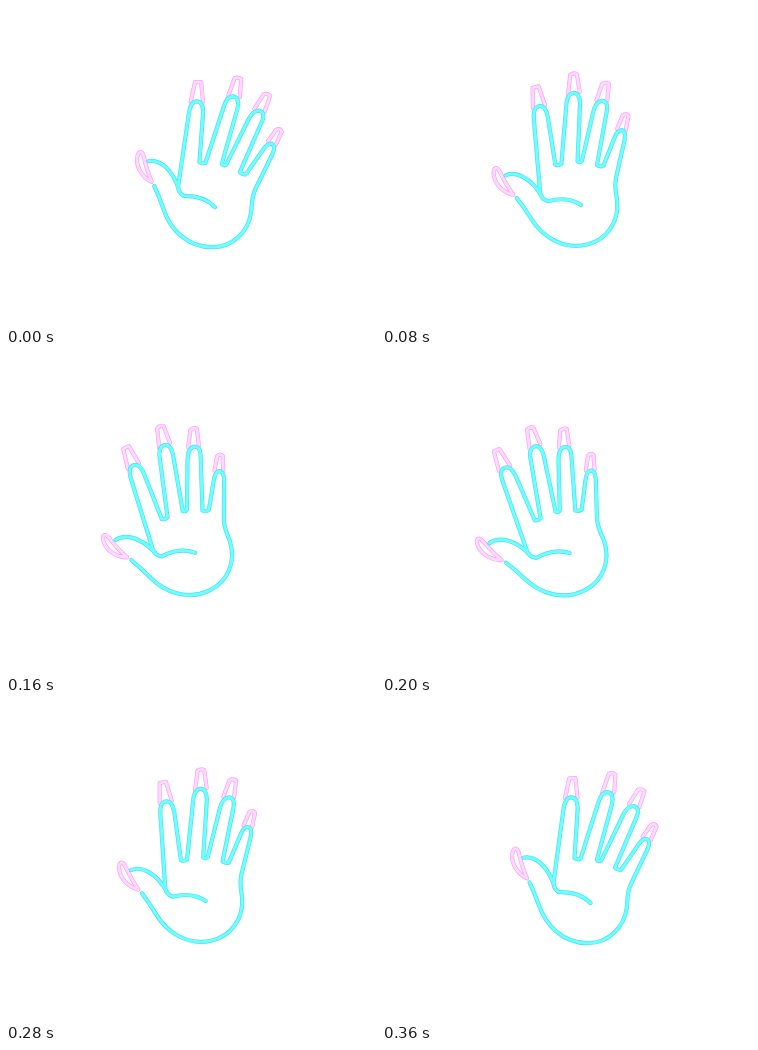
Recreate the animation shown at these times as an HTML page. Size 370 by 320 pixels, loop 0.4 s.

```html
<!DOCTYPE html>
<html lang="en">
<head>
<meta charset="utf-8">
<title>Waving hand</title>
<style>
html, body { margin: 0; width: 100%; height: 100%; overflow: hidden; background: #fff; }
svg { display: block; width: 370px; height: 320px; }
path { fill: none; stroke-linecap: round; stroke-linejoin: round; }
.edge { stroke-width: 4.2; }
.core { stroke-width: 2.8; }
.nails .edge { stroke: #f9a2f4; }
.nails .core { stroke: #ffd8ff; }
.skin .edge { stroke: #56dcee; }
.skin .core { stroke: #6cffff; }
</style>
</head>
<body>
<svg viewBox="0 0 370 320">
  <defs>
    <path id="nails" d="M184.6 96 L189 76.2 H195.2 L197 96
      M221.8 91 L228.6 72.2 Q232 70.6 235.2 73 L233.8 91
      M248.3 103 L257.6 88.4 Q261 87 264.2 89.8 L258.6 106
      M261.8 135.5 L270.4 123.6 Q274 122 275.8 125.4 L269.8 139
      M145.6 175.8 C138 172.4 130.6 163 131 153 C131.8 144.6 136 143.6 137.8 150.5 C139.7 160 142.5 168 145.6 175.8"/>
    <path id="skin" d="M142.5 155.2 C154 153 167 164 173 184
      M209 201.2 C202 194 191 189.5 177.5 190 Q171.5 186 172.2 180
      L182.8 108 C184 99 186.5 95.4 190.5 95.4 C195.5 95.4 197.3 100 197 108
      L193.4 156.2 Q196.4 158 199.4 157 L217.4 102
      C219.4 94.6 222.2 90.4 226.8 90.4 C231.6 90.8 233 95.4 231.6 102
      L215.8 158 Q217.8 160.4 220.2 158.6 L242.2 114
      C245.4 107.5 248.6 104.4 253 104.6 C258 106 258.2 110 256.2 115
      L233.8 166.2 Q236.6 168.8 239.8 168.4 L256.2 145
      C260 139 262.6 137 266 137.8 C269.2 139.4 268.6 143 266.5 148
      L249.9 182 C245.3 191 246.2 197 245.2 206
      C242.3 226 226.6 241.2 206 241.2 C181 241.2 164 223 157.4 203 Q153 190 148.2 180"/>
  </defs>
  <g id="hand">
    <g class="nails"><use href="#nails" class="edge"/><use href="#nails" class="core"/></g>
    <g class="skin"><use href="#skin" class="edge"/><use href="#skin" class="core"/></g>
  </g>
</svg>
<script>
const hand = document.getElementById("hand");
const STEP = 40;
// degrees of swing held for each step of the wave
const swing = [0, -6.4, -13.3, -20.2, -25.6, -27.7, -21, -12.2, -4.4, -0.6];

function draw(ms) {
  const i = Math.floor(ms / STEP) % swing.length;
  hand.setAttribute("transform", `rotate(${swing[i]} 194 243.5)`);
}

const start = performance.now();
function tick(now) {
  draw(Math.max(0, now - start));
  requestAnimationFrame(tick);
}
draw(0);
requestAnimationFrame(tick);
</script>
</body>
</html>
```
